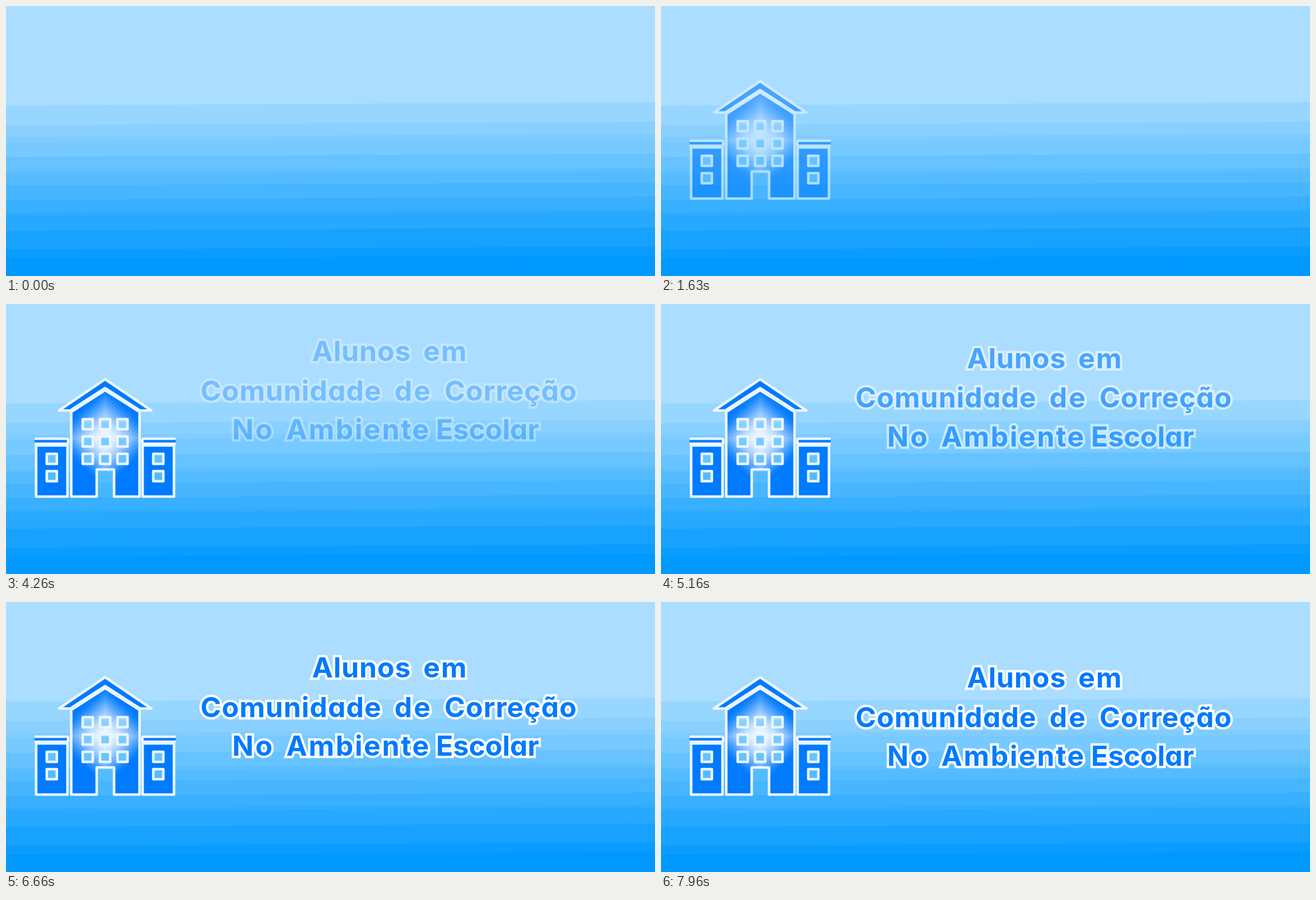
An HTML page for the animation above (8000 ms loop, 1159 by 483 pixels).

```html
<!DOCTYPE html>
<html lang="pt">
<head>
<meta charset="utf-8">
<title>Alunos em Comunidade de Correção No Ambiente Escolar</title>
<style>
  html, body { margin: 0; width: 100%; height: 100%; overflow: hidden; background: #adf; }
  svg { display: block; width: 1159px; height: 483px; }
  .wall { fill: #007aff; fill-rule: evenodd; stroke: #ebf6ff; stroke-width: 4.6; stroke-linejoin: round; }
  text {
    font: 700 50px Inter, "Open Sans", sans-serif;
    font-feature-settings: "cv11";
    text-anchor: middle;
    fill: #007aff;
    stroke: #fff;
    stroke-width: 8.4;
    stroke-linejoin: miter;
    stroke-miterlimit: 4;
    paint-order: stroke;
  }
</style>
</head>
<body>
<svg id="stage" viewBox="0 0 1159 483">
  <defs>
    <clipPath id="edges"><rect x="51" y="120" width="252" height="240"/></clipPath>
    <clipPath id="inside"><path id="insideShape" clip-rule="evenodd"/></clipPath>
  </defs>
  <g id="sky"></g>
  <g id="school" clip-path="url(#edges)" opacity="0"></g>
  <g id="title" opacity="0"></g>
</svg>
<script>
const LOOP = 8000, STEP = 100;
const $ = id => document.getElementById(id);

function add(parent, tag, attrs, text) {
  const el = document.createElementNS("http://www.w3.org/2000/svg", tag);
  for (const key in attrs) el.setAttribute(key, attrs[key]);
  if (text) el.textContent = text;
  parent.appendChild(el);
  return el;
}

const box = (x, y, w, h) => `M${x} ${y}h${w}v${h}h${-w}Z`;
const pane = (x, y) => box(x, y, 18, 18);

// Sky bands: left edge y and colour, each rising 6px to the right
const bands = [
  [178, "#97d6ff"], [213, "#8ad0ff"], [234, "#80ccff"], [243, "#77caff"],
  [270, "#66c3ff"], [296, "#5bbfff"], [302, "#55bbff"], [321, "#47b6ff"],
  [347, "#38afff"], [369, "#30acff"], [374, "#26a9ff"], [402, "#17a2ff"],
  [436, "#0a9dff"], [452, "#0099ff"]
];
add($("sky"), "rect", { width: 1159, height: 483, fill: "#aaddff" });
for (const [y, fill] of bands)
  add($("sky"), "path", { d: `M0 ${y}L1159 ${y - 6}V483H0Z`, fill });

// School
let body = "M116.500 344.500V193L177 154L238.500 193V344.500H193V296H162V344.500Z";
for (const y of [206, 237, 268])
  for (const x of [137, 168, 199]) body += pane(x, y);

function wing(x, capX) {
  const wall = box(x, 253, 56, 91.5) + pane(x + 19, 268) + pane(x + 19, 299);
  add($("school"), "path", { d: wall, class: "wall" });
  add($("school"), "rect", { x: capX, y: 241, width: 66, height: 9, rx: 2, class: "wall" });
}

function glow() {
  const g = add($("school"), "g", { "clip-path": "url(#inside)" });
  const count = 11;
  for (let i = 0; i < count; i++) {
    const r = 86 - i * 7, m = r * 0.53;
    const points = [[0, -r], [m, -m], [r, 0], [m, m], [0, r], [-m, m], [-r, 0], [-m, -m]]
      .map(([x, y]) => `${177 + x},${240 + y}`).join(" ");
    add(g, "polygon", { points, fill: "#fff", opacity: 0.06 + 0.026 * i });
  }
}

$("insideShape").setAttribute("d", body);
wing(53.8, 45);
wing(244, 243.5);
add($("school"), "path", { d: body, class: "wall", style: "stroke:none" });
glow();
add($("school"), "path", { d: body, class: "wall", style: "fill:none" });
add($("school"), "path", {
  d: "M177 134.500L259.500 190.500H239L177 150.500L115 190.500H94.500Z", class: "wall"
});

// Title words: text, centre, baseline, tracking
const words = [
  ["Alunos", 634.5, 153, 0.8], ["em", 784, 153, 2],
  ["Comunidade", 508.5, 223.5, 1], ["de", 726, 223.5, 3],
  ["Correção", 901, 223.5, 1],
  ["No", 440, 293, 3], ["Ambiente", 628, 293, 2.6], ["Escolar", 860, 293, 0]
];
for (const [word, x, y, track] of words)
  add($("title"), "text", { x: x + track / 2, y, "letter-spacing": track }, word);

const clamp = v => Math.min(1, Math.max(0, v));
const hold = (t, start) => start + Math.floor((t - start) / STEP) * STEP;

function draw(t) {
  const fade = t < 230 ? 0 : clamp((hold(t, 230) - 130) / 2600);
  $("school").setAttribute("opacity", fade);

  const s = hold(t, 3060);
  const shown = t < 3060 ? 0 : clamp((s - 2960) / 3500) ** 1.2;
  $("title").setAttribute("opacity", shown);
  $("title").setAttribute("transform", `translate(0 ${(s - 7960) * 0.01367})`);
}

const begin = performance.now();
function tick() {
  draw((performance.now() - begin) % LOOP);
  requestAnimationFrame(tick);
}
draw(0);
requestAnimationFrame(tick);
</script>
</body>
</html>
```
